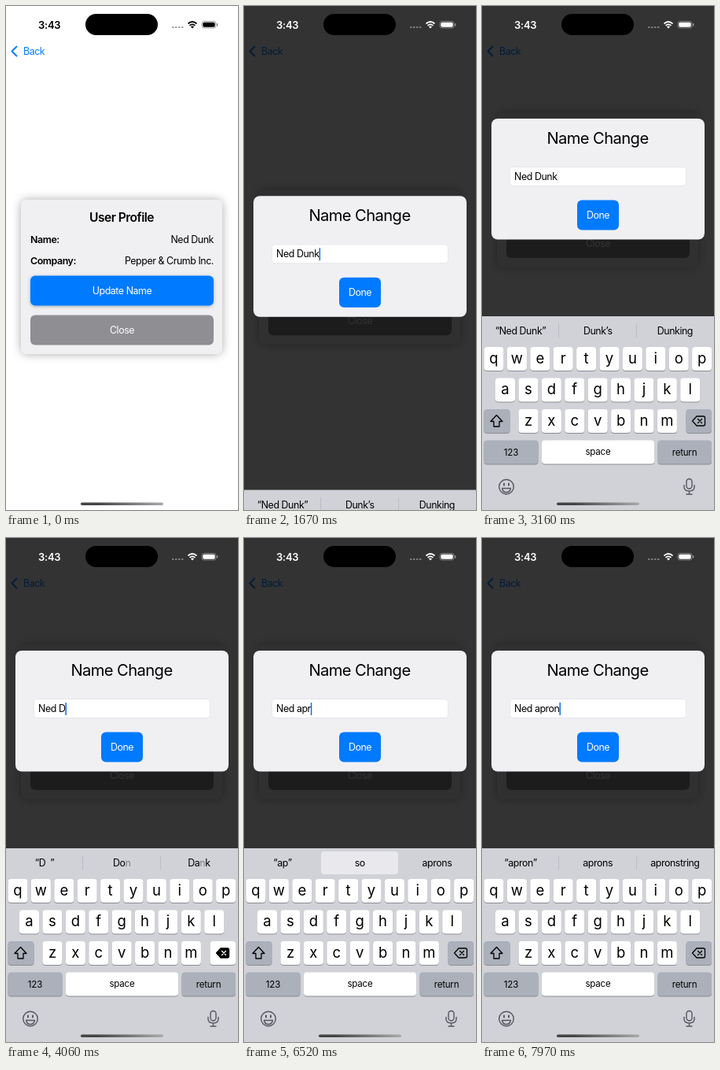
Recreate the animation shown at these times as an HTML page. Size 295 by 640 pixels, loop 8000 ms.

```html
<!DOCTYPE html>
<html lang="en">
<head>
<meta charset="utf-8">
<title>Name change</title>
<style>
  html, body { margin: 0; height: 100%; overflow: hidden; background: #fff; }
  svg { display: block; width: 295px; height: 640px; }
  text { font: 12.4px Inter, "Noto Sans", sans-serif; letter-spacing: -.035em; white-space: pre; }
  .mid { text-anchor: middle; }
  .end { text-anchor: end; }
  .bold { font-weight: 600; }
  .key { font-size: 18.5px; letter-spacing: 0; }
  .big { font-size: 26px; letter-spacing: 0; }
  .small { font-size: 11.6px; letter-spacing: -.02em; }
  .line { fill: none; stroke-linecap: round; stroke-linejoin: round; }
</style>
</head>
<body>
<svg viewBox="0 0 295 640">
  <defs>
    <filter id="soft" x="-20%" y="-20%" width="140%" height="140%"><feDropShadow dx="0" dy="0" stdDeviation="6" flood-opacity=".33"/></filter>
    <filter id="lift" x="-30%" y="-30%" width="160%" height="160%"><feDropShadow dx="0" dy="1" stdDeviation="2" flood-opacity=".3"/></filter>
    <linearGradient id="bar"><stop offset=".2" stop-color="#444"/><stop offset="1" stop-color="#aaa"/></linearGradient>
  </defs>
  <rect width="295" height="640" fill="#fff"/>

  <g id="card">
    <rect x="19" y="246" width="256" height="196" rx="8" fill="#f0f0f2" filter="url(#soft)"/>
    <text class="mid bold" x="147" y="273.5" style="font-size:15.6px">User Profile</text>
    <text class="bold" x="31" y="301">Name:</text>
    <text class="end" x="264" y="301">Ned Dunk</text>
    <text class="bold" x="31" y="328">Company:</text>
    <text class="end" x="264" y="328">Pepper &amp; Crumb Inc.</text>
    <rect x="31" y="342.5" width="233" height="38" rx="6" fill="#007aff" filter="url(#lift)"/>
    <text class="mid" x="147.5" y="366" fill="#fff">Update Name</text>
    <rect x="31" y="392.5" width="233" height="38" rx="6" fill="#8e8e93"/>
    <text class="mid" x="147.5" y="416" fill="#fff">Close</text>
  </g>

  <rect id="dim" width="295" height="640" opacity="0"/>

  <g id="back">
    <path class="line" d="M13.5 51.5L7.5 57.5L13.5 63.5" stroke="currentColor" stroke-width="1.8"/>
    <text x="22" y="62" fill="currentColor">Back</text>
  </g>

  <g id="status" fill="currentColor">
    <text class="bold" x="41" y="28.5" style="font-size:13px;letter-spacing:-.02em">3:43</text>
    <path d="M211 26h2.5v2h-2.5zM215 26h2.5v2h-2.5zM219 26h2.5v2h-2.5zM223 26h2.5v2h-2.5z" opacity=".35"/>
    <path class="line" style="stroke-linecap:butt" d="M231.5 22.5q5.500 -5 11 0M233.500 24.800q3.500 -3 7 0" stroke="currentColor" stroke-width="1.7"/>
    <path d="M234.900 26.200q2.100 -1.600 4.200 0L237 28.600z"/>
    <rect x="249" y="19.500" width="18" height="8.500" rx="2.800" fill="none" stroke="currentColor" stroke-width=".8" opacity=".45"/>
    <rect x="250.300" y="20.800" width="15.400" height="5.900" rx="1.700"/>
    <rect x="268" y="22" width="1.300" height="3.500" rx=".6" opacity=".5"/>
  </g>
  <rect x="101" y="10" width="92" height="27" rx="13.500"/>

  <g id="dialog" opacity="0">
    <rect x="12" y="253.500" width="271" height="153.500" rx="8" fill="#f0f0f3"/>
    <text class="mid" x="147" y="285" style="font-size:20.200px;letter-spacing:-.03em">Name Change</text>
    <rect x="35.500" y="315" width="224" height="24" rx="4" fill="#fff" stroke="#e2e2e6" stroke-width=".8"/>
    <text id="field" x="41" y="331.500"></text>
    <rect id="caret" y="319.500" width="1.500" height="16" fill="#0a6fe8"/>
    <rect x="121" y="357" width="53" height="38" rx="6" fill="#007aff"/>
    <text class="mid" x="147.500" y="380.500" fill="#fff">Done</text>
  </g>

  <rect id="home" x="95" y="630.500" width="105" height="3.500" rx="1.750" fill="url(#bar)"/>

  <g id="board" transform="translate(0 300)">
    <rect y="394" width="295" height="260" fill="#d1d2d8"/>
    <g id="hints"></g>
    <g id="keys"></g>
    <g class="line" stroke="#55585e" stroke-width="1.400">
      <circle cx="31" cy="610.500" r="9.300"/>
      <path d="M25.500 612.500h11q-1 5 -5.500 5t-5.500 -5z"/>
      <path d="M28 606.500v2M34 606.500v2" stroke-width="2"/>
      <rect x="260" y="600.500" width="7" height="12.500" rx="3.500"/>
      <path d="M257 608.500v2q0 5.500 6.500 5.500t6.500 -5.500v-2M263.500 616v4M260 620h7"/>
    </g>
    <rect x="95" y="630.500" width="105" height="3.500" rx="1.750" fill="url(#bar)"/>
    <g id="callout"></g>
  </g>
</svg>
<script>
const $ = id => document.getElementById(id);
const clamp = (v, lo = 0, hi = 1) => Math.min(hi, Math.max(lo, v));
const ramp = (t, a, b) => clamp((t - a) / (b - a));
const mix = (a, b, k) => `rgb(${a.map((v, i) => v + (b[i] - v) * k)})`;
const at = (list, t) => list.findLast(e => e[0] <= t);

const GREY = '#abb0ba', WHITE = '#fff';
const TYPED = [
  [0, 'Ned Dunk'], [3520, 'Ned Dun'], [3740, 'Ned Du'], [3960, 'Ned D'],
  [4380, 'Ned '], [4600, 'Ned'], [4920, 'Ned '], [5450, 'Ned a'],
  [6200, 'Ned ap'], [6420, 'Ned apr'], [6750, 'Ned apro'], [7190, 'Ned apron']
];
const HINTS = [
  [0, '“Ned Dunk”', 'Dunk’s', 'Dunking'], [3640, '“Dun”', 'Dunk', 'Dune'],
  [3850, '“Du”', 'Don', 'Dank'], [3960, '“D  ”', 'Do_n', 'Da_nk'],
  [4160, '“D”', 'Do', 'Day'], [4490, 'is', 'has', 'was'],
  [4710, '“Ned”', 'Need', 'Next'], [5030, 'is', 'has', 'was'],
  [5560, '“a”', 'and', 'so'], [6310, '“ap”', 'so', 'apart'],
  [6520, '“ap”', 'so', 'aprons', 1], [6640, '“apr”', 'apron', 'aprons'],
  [6860, '“apro”', 'apron', 'aprons'], [7300, '“apron”', 'aprons', 'apronstring']
];
const PRESSES = [
  [3520, 3640, 'del'], [3740, 3850, 'del'], [3960, 4160, 'del'],
  [4380, 4490, 'del'], [4600, 4710, 'del'], [4810, 4920, 'space'],
  [5230, 5450, 'a'], [6090, 6200, 'p'], [6310, 6420, 'r'],
  [6640, 6750, 'o'], [6970, 7190, 'n']
];

const keys = {};
function addKey(name, x, y, w, fill, face) {
  keys[name] = { x, y, w, fill };
  $('keys').innerHTML += `<rect x="${x}" y="${y + 1}" width="${w}" height="30" rx="4" fill="#8b8d93"/>
    <rect id="k-${name}" x="${x}" y="${y}" width="${w}" height="30" rx="4" fill="${fill}"/>${face}`;
}
const label = (x, y, cls, s) => `<text class="mid ${cls}" x="${x}" y="${y}">${s}</text>`;

[['qwertyuiop', 2.5, 433], ['asdfghjkl', 17, 472.5], ['zxcvbnm', 46.5, 512]].forEach(([row, x0, y]) =>
  [...row].forEach((c, i) => {
    const x = x0 + i * 29.4;
    addKey(c, x, y, 25, WHITE, label(x + 12.5, y + 20.5, 'key', c));
  }));
addKey('shift', 2.5, 512, 33, GREY,
  '<path class="line" d="M18.500 519.500L26 527.500H22V534H15V527.500H11Z" stroke="#000" stroke-width="1.300"/>');
addKey('del', 259.5, 512, 32.5, GREY,
  `<path id="del-shape" class="line" d="M273 521h8.500q2 0 2 2v8q0 2 -2 2h-8.500l-5.500 -6z" stroke="#000" stroke-width="1.300"/>
   <path id="del-x" class="line" d="M274.500 524.500l5 5m0 -5l-5 5" stroke="#000" stroke-width="1.300"/>`);
addKey('123', 2.5, 551.5, 69, GREY, label(37, 571, 'small', '123'));
addKey('space', 76, 551.5, 143, WHITE, label(147.5, 570, 'small', 'space'));
addKey('return', 223.5, 551.5, 68.5, GREY, label(257.5, 571, 'small', 'return'));

function callout(c) {
  const { x, y, w } = keys[c], l = clamp(x - 10, 2, 248), r = l + 45, e = x + w;
  return `<path filter="url(#lift)" fill="#fcfcfe" d="M${l + 7} ${y - 48}H${r - 7}Q${r} ${y - 48} ${r} ${y - 41}
    V${y - 17}C${r} ${y - 7} ${e} ${y - 9} ${e} ${y + 3}V${y + 26}q0 4 -4 4H${x + 4}q-4 0 -4 -4V${y + 3}
    C${x} ${y - 9} ${l} ${y - 7} ${l} ${y - 17}V${y - 41}Q${l} ${y - 48} ${l + 7} ${y - 48}Z"/>`
    + label((l + r) / 2, y - 18, 'big', c);
}

// An underscore marks a letter that is fading.
function hintBar([, a, b, c, lit]) {
  const faint = s => s.replace(/_(.)/, '<tspan opacity=".4">$1</tspan>');
  const marks = lit
    ? '<rect x="98" y="398" width="98" height="29" rx="4" fill="#e9e9ed"/>'
    : '<path d="M97.500 403.500v18M196.500 403.500v18" stroke="#bcbdc4"/>';
  return marks + [a, b, c].map((s, i) => label(49 + i * 98.2, 417, '', faint(s))).join('');
}

let shownHints, shownKey;
function press(name) {
  if (name === shownKey) return;
  shownKey = name;
  for (const k of ['del', 'space'])
    $('k-' + k).setAttribute('fill', (k === name) !== (keys[k].fill === GREY) ? GREY : WHITE);
  $('del-shape').style.fill = name === 'del' ? '#000' : 'none';
  $('del-x').setAttribute('stroke', name === 'del' ? WHITE : '#000');
  $('callout').innerHTML = name && name.length === 1 ? callout(name) : '';
}

function draw() {
  const t = performance.now() % 8000;
  const shown = t < 500 ? 0 : clamp(.45 + (t - 500) / 230);
  $('dim').setAttribute('opacity', .8 * shown);
  $('dialog').setAttribute('opacity', shown);
  $('status').style.color = mix([0, 0, 0], [255, 255, 255], ramp(t, 700, 1090));
  $('back').style.color = t < 630 ? mix([0, 122, 255], [8, 55, 110], shown)
    : mix([8, 55, 110], [2, 28, 56], ramp(t, 630, 1090));
  $('home').setAttribute('opacity', 1 - .8 * shown);

  // critically damped spring for the keyboard
  const s = Math.max(0, t - 1640) / 1000 * 18.26, left = (1 + s) * Math.exp(-s);
  const lift = `translate(0 ${-110.5 * (1 - left)})`;
  $('card').setAttribute('transform', lift);
  $('dialog').setAttribute('transform', lift);
  $('board').setAttribute('transform', `translate(0 ${248 * left})`);

  const text = at(TYPED, t)[1];
  if ($('field').textContent !== text) $('field').textContent = text;
  $('caret').setAttribute('x', 41 + $('field').getComputedTextLength());
  $('caret').setAttribute('opacity', t < 1560 ? 0 : 1 - ramp(t, 2490, 2620) + ramp(t, 3150, 3280));

  const hints = at(HINTS, t);
  if (hints !== shownHints) $('hints').innerHTML = hintBar(shownHints = hints);
  press(PRESSES.find(([a, b]) => a <= t && t < b)?.[2]);
  requestAnimationFrame(draw);
}
draw();
</script>
</body>
</html>
```
